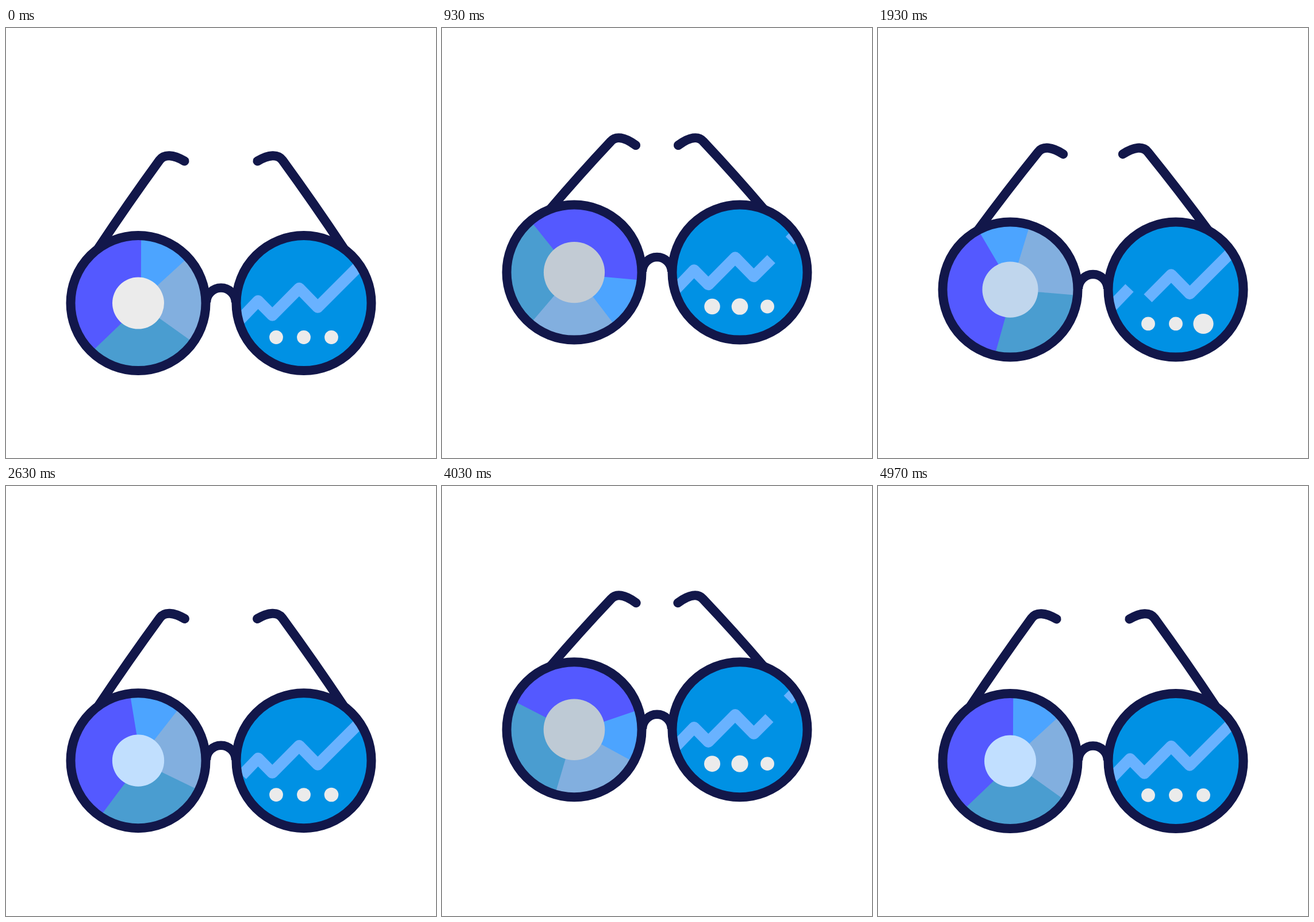
Recreate the animation shown at these times as an HTML page with a canvas. Size 748 px wide and 748 px high, loop 5010 ms.

```html
<!DOCTYPE html>
<html>
<head>
<meta charset="utf-8">
<title>Data glasses</title>
<style>
html, body { margin: 0; width: 100%; height: 100%; overflow: hidden; background: #fff; }
canvas { display: block; }
</style>
</head>
<body>
<canvas id="stage" width="748" height="748"></canvas>
<script>
const ctx = document.getElementById('stage').getContext('2d');
const LOOP = 5010;
const NAVY = '#12174a';
const LEFT = 230, RIGHT = 518, MID = 374;
const RAD = Math.PI / 180;

// Cubic Bezier easing with control points (a, 0) and (b, 1)
function ease(u, a, b) {
  let lo = 0, hi = 1;
  for (let i = 0; i < 30; i++) {
    const t = (lo + hi) / 2, s = 1 - t;
    if (3 * s * s * t * a + 3 * s * t * t * b + t * t * t < u) lo = t;
    else hi = t;
  }
  return lo * lo * (3 - 2 * lo);
}

const mix = (a, b, k) => a + (b - a) * k;
const mixAll = (a, b, k) => a.map((v, i) => mix(v, b[i], k));

// Value that goes 0 -> 1 -> 0 over the loop
function swing(f, outEase) {
  return f < 75 ? ease(f / 75, 0.5, outEase) : 1 - ease((f - 75) / 75, 0.167, 0.5);
}

const LIFT_KEYS = [0, 37, 75, 113, 150];
function lift(f) {
  let i = 0;
  while (i < 3 && f >= LIFT_KEYS[i + 1]) i++;
  const u = ease((f - LIFT_KEYS[i]) / (LIFT_KEYS[i + 1] - LIFT_KEYS[i]), 0.5, 0.5);
  return { part: i, u, e: i % 2 ? 1 - u : u };
}

function disc(x, y, r, fill) {
  ctx.fillStyle = fill;
  ctx.beginPath();
  ctx.arc(x, y, r, 0, 2 * Math.PI);
  ctx.fill();
}

function pen(color, width, cap) {
  ctx.strokeStyle = color;
  ctx.lineWidth = width;
  ctx.lineCap = cap;
  ctx.lineJoin = 'round';
}

function clipLens(x, y) {
  ctx.save();
  ctx.beginPath();
  ctx.arc(x, y, 114, 0, 2 * Math.PI);
  ctx.clip();
}

// Each arm: base, bend, two curve handles, tip
const ARM_LOW = [160.5, 383.2, 267, 230, 275, 219, 291, 220, 310.5, 231.5];
const ARM_HIGH = [190.2, 308.7, 296.3, 193.8, 305.3, 183.6, 320.3, 186.3, 340, 201];

function arms(e) {
  const p = mixAll(ARM_LOW, ARM_HIGH, e);
  pen(NAVY, 16, 'round');
  for (const side of [1, -1]) {
    ctx.save();
    ctx.translate(MID, 0);
    ctx.scale(side, 1);
    ctx.translate(-MID, 0);
    ctx.beginPath();
    ctx.moveTo(p[0], p[1]);
    // the shaft bows slightly outwards
    ctx.quadraticCurveTo((p[0] + p[2]) / 2 - 1.6, (p[1] + p[3]) / 2 - 1.2, p[2], p[3]);
    ctx.bezierCurveTo(...p.slice(4));
    ctx.stroke();
    ctx.restore();
  }
}

function wedge(from, to, fill, shift) {
  const dir = 118 * RAD;
  const x = shift * Math.sin(dir), y = -shift * Math.cos(dir);
  ctx.fillStyle = fill;
  ctx.beginPath();
  ctx.moveTo(x, y);
  ctx.arc(x, y, 140, (from - 90) * RAD, (to - 90) * RAD);
  ctx.fill();
}

const HUB = [[235, 235, 235], [190, 200, 209], [193, 223, 255], [190, 200, 209], [193, 223, 255]];

function pie(f, cy, up) {
  const turn = 360 * swing(f, 0.5) * RAD;
  clipLens(LEFT, cy);
  ctx.translate(LEFT, cy);
  ctx.rotate(turn);
  wedge(-5, 48.5, '#4ca4ff', 0);
  wedge(47.5, 126, '#82afdf', 0);
  wedge(125.5, 232, '#4a9dd0', 0);
  wedge(226.2, 360.2, '#5459ff', 3.5 + 1.8 * Math.cos(turn));
  ctx.restore();
  const c = mixAll(HUB[up.part], HUB[up.part + 1], up.u).map(Math.round);
  disc(LEFT, cy, mix(45, 54, up.e), `rgb(${c})`);
}

const TREND = [[395, 41.5], [438.5, -3.9], [463.3, 21.3], [510, -25.9], [542.3, 7.2], [626, -76.5]];

// Part of the trend line between two x positions
function trend(x0, x1, cy) {
  if (x1 <= x0) return;
  const at = x => {
    let i = 1;
    while (i < TREND.length - 1 && x > TREND[i][0]) i++;
    const [ax, ay] = TREND[i - 1], [bx, by] = TREND[i];
    return [x, mix(ay, by, (x - ax) / (bx - ax))];
  };
  const pts = [at(x0), ...TREND.filter(p => p[0] > x0 && p[0] < x1), at(x1)];
  ctx.beginPath();
  pts.forEach(([x, y]) => ctx.lineTo(x, cy + y));
  ctx.stroke();
}

function pulse(f, i) {
  const peak = f < 75 ? 17.5 + 20 * i : 131 - 19 * i;
  const d = Math.min(1, Math.abs(f - peak) / 17.5);
  return 11.9 + 5.7 * (1 - ease(d, 0.45, 0.55));
}

function chart(f, cy) {
  disc(RIGHT, cy, 114, '#0091e4');
  clipLens(RIGHT, cy);
  pen('#69b2ff', 19.8, 'butt');
  const gap = mix(618, 372, swing(f, 0.833));
  trend(395, Math.max(395, Math.min(gap, 626)), cy);
  if (gap + 32 < 626) trend(Math.max(395, gap + 32), 626, cy);
  ctx.restore();
  for (let i = 0; i < 3; i++) disc(470 + 48 * i, cy + 59.4, pulse(f, i), '#ebebeb');
}

function frame(cy) {
  pen(NAVY, 16, 'butt');
  for (const x of [LEFT, RIGHT]) {
    ctx.beginPath();
    ctx.arc(x, cy, 117.5, 0, 2 * Math.PI);
    ctx.stroke();
  }
  ctx.lineWidth = 15.5;
  ctx.beginPath();
  ctx.arc(MID, cy - 1, 25.5, Math.PI, 0);
  ctx.stroke();
}

function draw(ms) {
  const f = Math.min(149, Math.floor(ms * 0.03 + 0.15));
  const up = lift(f);
  const cy = mix(478.6, 419.2, up.e);
  ctx.fillStyle = '#fff';
  ctx.fillRect(0, 0, 748, 748);
  arms(up.e);
  pie(f, cy, up);
  chart(f, cy);
  frame(cy);
}

const start = performance.now();
function tick() {
  draw((performance.now() - start) % LOOP);
  requestAnimationFrame(tick);
}
tick();
</script>
</body>
</html>
```
